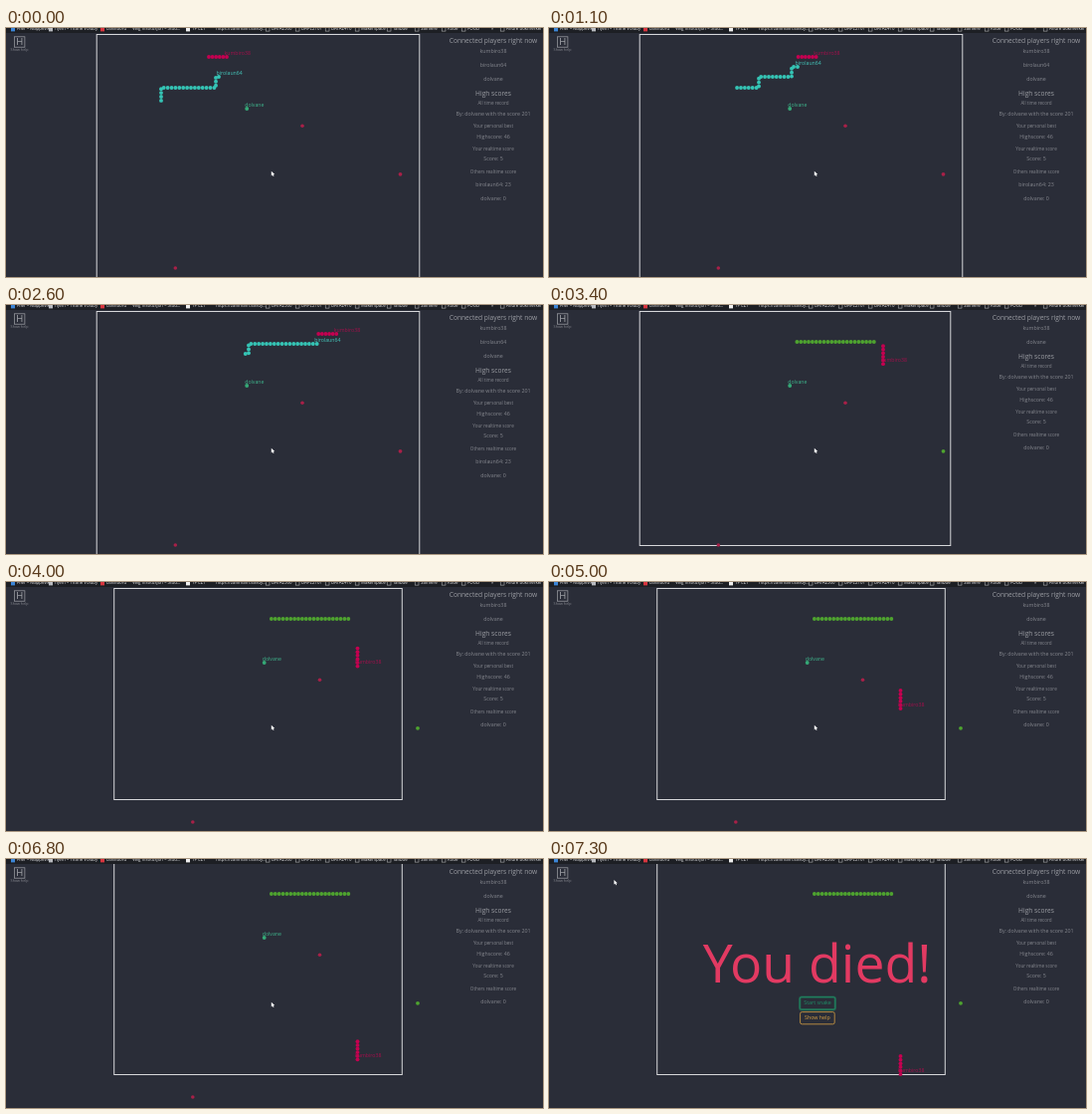
Recreate the animation shown at these times as an HTML page with a canvas. Size 540x250 px, loop 7400 ms.

```html
<!DOCTYPE html>
<html lang="no">
<head>
<meta charset="utf-8">
<title>Snake</title>
<style>
  html, body { margin: 0; width: 100%; height: 100%; overflow: hidden; background: #2a2d38; }
  canvas { display: block; width: 540px; height: 250px; }
</style>
</head>
<body>
<canvas id="stage"></canvas>
<script>
const W = 540, H = 250, LOOP = 7400, STEP = 100;
const DEATH = 3100, RECENTER = 4000, SCROLL = 5300, GAME_OVER = 7300;
const DOT = 1.95;
const FONT = '"Open Sans", "Noto Sans", sans-serif';
const BG = '#2a2d38', PINK = '#c40050', TEAL = '#35c4b5', GREEN = '#4ea32f', RED = '#a82048';
const ME = 'kumbiro38', RIVAL = 'birolaun64', IDLE = 'dolvane';

const canvas = document.getElementById('stage');
const ctx = canvas.getContext('2d');
const ratio = window.devicePixelRatio || 1;
canvas.width = W * ratio;
canvas.height = H * ratio;

const myPath = [[150, 29], [336, 29], [336, 400]];
const rivalPath = [[156, 100], [156, 60], [211, 60], [211, 49], [244, 49], [244, 39], [400, 39]];

function pointAt(path, dist) {
  for (let i = 1; i < path.length; i++) {
    const [x0, y0] = path[i - 1], [x1, y1] = path[i];
    const len = Math.hypot(x1 - x0, y1 - y0);
    if (dist <= len) {
      const k = dist / len;
      return [x0 + (x1 - x0) * k, y0 + (y1 - y0) * k];
    }
    dist -= len;
  }
  return path[path.length - 1];
}

function text(str, x, y, size, color, align = 'left', baseline = 'middle') {
  ctx.font = `${size}px ${FONT}`;
  ctx.fillStyle = color;
  ctx.textAlign = align;
  ctx.textBaseline = baseline;
  ctx.fillText(str, x, y);
}

function dot(x, y, color, r = DOT) {
  ctx.fillStyle = color;
  ctx.beginPath();
  ctx.arc(x, y, r, 0, Math.PI * 2);
  ctx.fill();
}

function snake(path, dist, count, gap, color, name, nameColor) {
  for (let i = count - 1; i >= 0; i--) dot(...pointAt(path, dist - i * gap), color);
  const [x, y] = pointAt(path, dist);
  text(name, x - 2.4, y - 3.6, 5.2, nameColor);
}

function bookmarks() {
  ctx.fillStyle = '#1d1f24';
  ctx.fillRect(0, 0, W, 5);
  const links = [
    [11, 'Filer – Mappevik', '#3c86d8'], [49, 'Hjem – Tirane Voldby', '#b9bbc0'],
    [101, 'Dashbord', '#d8353f'], [127, 'Velg institusjon – Stud…'],
    [187, 'TP EZ1', '#f0f0f0'], [211, 'https://zanimam.sandy…'],
    [267, 'DATA2500', ''], [297, 'DAPE2101', ''], [327, 'DATA2410', ''],
    [357, 'Makerspace', ''], [389, 'TallBue', ''], [417, 'Samlere', ''],
    [444, 'Kode', ''], [464, 'FOOD', ''], [488, '»'], [503, 'Andre bokmerker', '']
  ];
  for (const [x, label, icon] of links) {
    text(label, x, 1.3, 4.4, '#dcdddf');
    if (icon) {
      ctx.fillStyle = icon;
      ctx.fillRect(x - 6, 0, 4, 3.4);
    } else if (icon === '') {
      ctx.strokeStyle = '#c9cacc';
      ctx.lineWidth = 0.5;
      ctx.strokeRect(x - 5.8, -0.5, 3.8, 3.6);
    }
  }
}

function helpIcon() {
  ctx.strokeStyle = '#a2a4a9';
  ctx.lineWidth = 0.7;
  ctx.strokeRect(8.5, 8.8, 10.4, 10.4);
  text('H', 13.7, 14.2, 9.5, '#a9abb0', 'center');
  text('Show help', 13.5, 22.2, 3.7, '#85878e', 'center');
}

function sidebar(rivalAlive) {
  const line = (str, y, size = 5.3) =>
    text(str, 490, y, size, size > 6 ? '#9b9da3' : '#85878e', 'center');
  line('Connected players right now', 13, 6.65);
  line(ME, 24);
  if (rivalAlive) line(RIVAL, 38);
  const up = rivalAlive ? 0 : 14;
  line(IDLE, 52 - up);
  line('High scores', 66.5 - up, 6.65);
  line('All time record', 76 - up, 4.6);
  line(`By: ${IDLE} with the score 201`, 86.5 - up);
  line('Your personal best', 99 - up, 4.6);
  line('Highscore: 46', 109.5 - up);
  line('Your realtime score', 122 - up, 4.6);
  line('Score: 5', 132 - up);
  line('Others realtime score', 144.7 - up, 4.6);
  if (rivalAlive) line(`${RIVAL}: 23`, 157.7);
  line(`${IDLE}: 0`, rivalAlive ? 171.7 : 143.7);
}

function board(t) {
  const over = t >= GAME_OVER;
  const alive = t < DEATH;
  const shrink = Math.min(35, Math.max(0, (t - DEATH) * 0.04));
  ctx.save();
  ctx.translate(t >= RECENTER ? 17.5 : 0, t >= SCROLL ? -2 : 0);

  ctx.strokeStyle = '#d6d7da';
  ctx.lineWidth = 1;
  ctx.strokeRect(91.2, 6.5, 324.6 - shrink, 247 - shrink);

  if (!over) {
    dot(298, 98.2, RED, 1.8);
    dot(170.3, 241, RED, 1.8);
    dot(242.2, 81, '#35a876');
    text(IDLE, 240.2, 77.2, 5.2, '#3fb58c');
  }
  dot(396.5, 146.8, alive ? RED : GREEN, 1.9);

  if (alive) {
    snake(rivalPath, 109 + t * 0.0418, 22, 3.9, TEAL, RIVAL, '#45c9bd');
  } else {
    for (let i = 0; i < 21; i++) dot(249.4 + i * 3.87, 37, GREEN);
  }
  snake(myPath, Math.min(375, 72 + t * 0.0424), 6, 3.6, PINK, ME, '#a50f4c');
  ctx.restore();
}

function button(label, x, y, w, h, color, ring) {
  ctx.beginPath();
  ctx.roundRect(x, y, w, h, 1.8);
  ctx.fillStyle = BG;
  ctx.fill();
  if (ring) {
    ctx.strokeStyle = ring;
    ctx.lineWidth = 2.4;
    ctx.stroke();
  }
  ctx.strokeStyle = color;
  ctx.lineWidth = 0.8;
  ctx.stroke();
  text(label, x + w / 2, y + h / 2 + 0.1, 5.3, color, 'center');
}

function gameOver() {
  text('You died!', 269.6, 124.2, 53.5, '#e23a62', 'center', 'alphabetic');
  button('Start snake', 252.2, 138.6, 35.6, 12.6, '#1f9068', 'rgba(31,130,90,.5)');
  button('Show help', 252.6, 153.6, 34.6, 12.2, '#d6a043');
}

function pointer(x, y) {
  const shape = [[0, 0], [0, 4.6], [1.1, 3.7], [1.9, 5.3], [2.7, 4.9], [2, 3.4], [3.4, 3.3]];
  ctx.beginPath();
  for (const [dx, dy] of shape) ctx.lineTo(x + dx, y + dy);
  ctx.closePath();
  ctx.fillStyle = '#fff';
  ctx.fill();
}

function draw(t) {
  ctx.setTransform(ratio, 0, 0, ratio, 0, 0);
  ctx.fillStyle = BG;
  ctx.fillRect(0, 0, W, H);
  board(t);
  helpIcon();
  sidebar(t < DEATH);
  bookmarks();
  if (t >= GAME_OVER) {
    gameOver();
    pointer(65.4, 21);
  } else {
    pointer(266.8, 143.8);
  }
}

const start = performance.now();
function frame() {
  const t = (performance.now() - start) % LOOP;
  draw(Math.floor(t / STEP) * STEP);
  requestAnimationFrame(frame);
}
frame();
</script>
</body>
</html>
```
